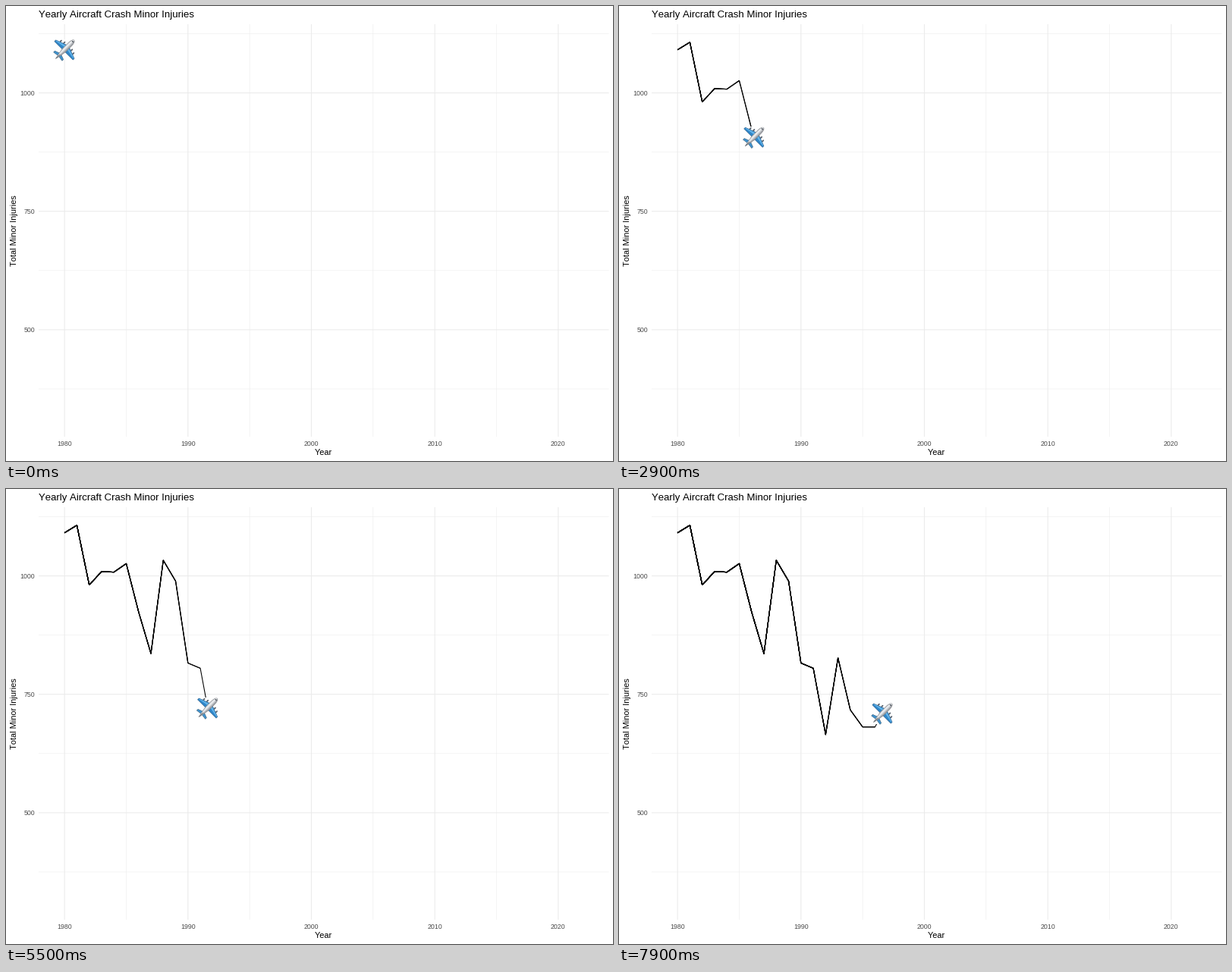
A matplotlib script for the animation above (8 s loop, 800 px wide and 600 px high).

```python
import matplotlib.pyplot as plt
import numpy as np
from matplotlib.animation import FuncAnimation
from matplotlib.collections import LineCollection
from matplotlib.patches import Ellipse, Polygon
from matplotlib.transforms import Affine2D

plt.rcParams["font.family"] = "Liberation Sans"
plt.rcParams["text.kerning_factor"] = 6   # plain advances, no kerning

W, H, DPI = 800, 600, 100
FRAMES, INTERVAL = 80, 100
PT = 72 / DPI                      # points per pixel
LEFT, RIGHT, TOP, BOTTOM = 43, 794.5, 24, 568
LINE = 1.07

INJURIES = np.array([1091, 1107, 981, 1009, 1008, 1026, 924, 836, 1033,
                     989, 816, 805, 665, 827, 717, 681, 681, 729])


def px(year):
    return 77.16 + (year - 1980) * 16.266


def py(value):
    return 114.6 + (1000 - value) * 0.6246


STEPS = np.arange(len(INJURIES))
KNOTS = np.round(STEPS * 199 / 42)  # each year lands on a whole frame
XS, YS = px(1980 + STEPS), py(INJURIES)

fig = plt.figure(figsize=(W / DPI, H / DPI), dpi=DPI, facecolor="white")
ax = fig.add_axes([0, 0, 1, 1])
ax.set_xlim(0, W)
ax.set_ylim(H, 0)
ax.axis("off")


def label(x, y, text, size, color="black", **kw):
    ax.text(x, y, text, fontsize=size * PT, color=color, va="baseline", **kw)


def add_lines(segs, color, width, zorder):
    lines = LineCollection(segs, colors=color, linewidths=width * PT,
                           capstyle="butt", joinstyle="round", zorder=zorder)
    lines.set_snap(False)
    return ax.add_collection(lines, autolim=False)


def grid(xs, ys, width):
    segs = [[(x, TOP), (x, BOTTOM)] for x in xs]
    segs += [[(LEFT, y), (RIGHT, y)] for y in ys]
    add_lines(segs, "#EBEBEB", width, 1)


years, values = np.arange(1980, 2021, 10), np.arange(500, 1001, 250)
grid(px(years[:-1] + 5), py(np.arange(375, 1126, 250)), LINE / 2)
grid(px(years), py(values), LINE)

for year in years:
    label(px(year), 579.6, str(year), 8.8, "#4D4D4D", ha="center")
for value in values:
    label(38.1, py(value) + 3.2, str(value), 8.8, "#4D4D4D", ha="right")
label(LEFT, 15, "Yearly Aircraft Crash Minor Injuries", 13.2)
label((LEFT + RIGHT) / 2, 592.3, "Year", 11, ha="center")
label(14, (TOP + BOTTOM) / 2, "Total Minor Injuries", 11, ha="center",
      rotation=90, rotation_mode="anchor")

trail = add_lines([], "black", LINE, 2)

# The plane is built nose along +x, then turned to point up and right.
place = Affine2D()


def add(patch):
    patch.set_transform(place + ax.transData)
    patch.set_zorder(3)
    ax.add_patch(patch)


def shape(points, color, edge="none", width=0.0):
    add(Polygon(points, closed=True, facecolor=color, edgecolor=edge,
                linewidth=width * PT, joinstyle="round"))


def oval(x, y, w, h, color):
    add(Ellipse((x, y), w, h, facecolor=color, edgecolor="none"))


def fins(front, chord, sweep, taper, span, color, edge="none", width=0.0):
    """A tapered, swept-back fin on each side of the body."""
    tip = front - sweep
    for side in (1, -1):
        shape([(front, side), (tip, side * span),
               (tip - chord * taper, side * span), (front - chord, side)],
              color, edge, width)


def hull(low, high, color, edge="none", width=0.0):
    """The body between two fractions of its half width."""
    t = np.linspace(0, 1, 30)
    x = -16 + 34 * t
    tail = np.minimum(1, t / 0.45) ** 0.8
    nose = np.sqrt(1 - np.clip((t - 0.75) / 0.25, 0, 1) ** 2)
    y = 3 * tail * nose
    shape(np.vstack([np.column_stack([x, high * y]),
                     np.column_stack([x, low * y])[::-1]]), color, edge, width)


def build_plane():
    r = 19.3
    shape([(r, 0), (0, r), (-r, 0), (0, -r)], "white")
    for side in (1, -1):
        for n in (1, 2):
            oval(8.2 - 1.8 * n, side * (2.2 + 4.7 * n), 4, 2, "#5B6570")
    fins(7, 8.5, 6, 0.3, 17.3, "#2F86C9", "#2C587F", 0.5)
    fins(5.8, 3, 4.8, 0.3, 16.3, "#62B4EA")
    fins(-7.5, 4, 2.6, 0.6, 8, "#3F93CF", "#35566F", 0.5)
    hull(-1, 1, "#A5A8AD", "#797C81", 0.6)
    hull(-0.35, 0.9, "#CFD2D6")
    hull(0.1, 0.65, "#EDEFF1")
    oval(-12.5, 0, 9, 1.3, "#74797F")
    oval(15.3, 0, 1.5, 3, "#555B63")


build_plane()


def position(frame):
    return np.interp(frame, KNOTS, XS), np.interp(frame, KNOTS, YS)


def path_until(frame):
    past = KNOTS < frame
    return np.vstack([np.column_stack([XS[past], YS[past]]), position(frame)])


def update(frame):
    # Every finished year leaves its own copy, so older parts look bolder.
    ends = [k for k in KNOTS[1:] if k < frame] + [frame] * (frame > 0)
    trail.set_segments([path_until(end) for end in ends])
    place.clear().rotate_deg(45).scale(1, -1).translate(*position(frame))
    return [trail]


anim = FuncAnimation(fig, update, frames=FRAMES, interval=INTERVAL,
                     repeat=True, repeat_delay=0, blit=False)
plt.show()
```
